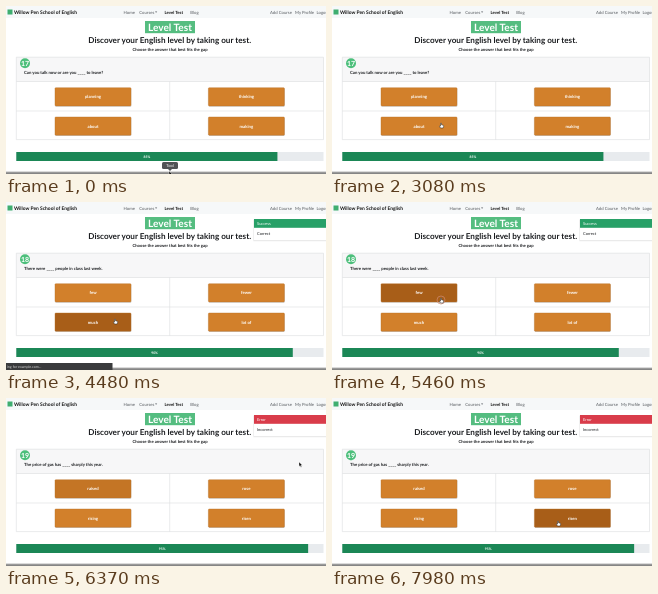
Animation of 320x168 px, one loop 8000 ms. Source, as an HTML page:

```html
<!DOCTYPE html>
<html lang="en">
<head>
<meta charset="utf-8">
<title>Level Test</title>
<style>
  html, body { margin: 0; width: 100%; height: 100%; overflow: hidden; background: #fff; }
  svg { display: block; width: 100%; height: 100%; }
  text { font-family: Lato, "Open Sans", sans-serif; font-size: 4.25px; fill: #1b1d20; text-rendering: geometricPrecision; }
  .b { font-weight: 700; }
  .m { text-anchor: middle; }
  .w { fill: #fff; }
  .nav text { fill: #55595e; }
  .nav .on { fill: #111; }
  .line { stroke: #dcdee0; stroke-width: .6; fill: none; }
</style>
</head>
<body>
<svg viewBox="0 0 320 168" preserveAspectRatio="none">
  <rect width="320" height="168" fill="#fff"/>

  <g class="nav">
    <rect width="320" height="12" fill="#f6f8f9"/>
    <rect x="1.5" y="3.5" width="5" height="5" fill="#3fae70"/>
    <text class="b on" x="8" y="7.8" style="font-size:4.9px">Willow Pen School of English</text>
    <text x="117.6" y="7.5">Home</text>
    <text x="133.3" y="7.5">Courses</text>
    <path d="M149 5.5h2.2l-1.1 1.3z" fill="#55595e"/>
    <text class="b on" x="158.5" y="7.5">Level Test</text>
    <text x="184.3" y="7.5">Blog</text>
    <text x="264" y="7.5">Add Course</text>
    <text x="289" y="7.5">My Profile</text>
    <text x="310.5" y="7.5">Logout</text>
  </g>

  <rect x="139" y="15" width="50" height="12.2" fill="#55bd80"/>
  <text class="b m w" x="164" y="24.7" style="font-size:10.1px">Level Test</text>
  <text class="b m" x="163.7" y="36.8" style="font-size:8.15px">Discover your English level by taking our test.</text>
  <text class="b m" x="164" y="45" style="font-size:4.2px">Choose the answer that best fits the gap</text>

  <rect x="10.3" y="51.2" width="307.2" height="24.3" fill="#f7f7f8"/>
  <path class="line" d="M10.3 51.2H317.5V133.6H10.3zM10.3 75.5H317.5M10.3 105H317.5M163.7 75.5V133.6"/>
  <circle cx="19" cy="57.2" r="5" fill="#4cbf7b"/>
  <text id="num" class="b m w" x="19" y="59.7" style="font-size:7px"></text>
  <text id="ask" class="b" x="18" y="68.4"></text>
  <g id="answers"></g>

  <rect x="10.3" y="146" width="307.2" height="9" fill="#e8ebee"/>
  <rect id="bar" x="10.3" y="146" height="9" fill="#1b8756"/>
  <text id="pct" class="b m w" y="151.8" style="font-size:3.4px"></text>

  <rect y="165.4" width="320" height=".8" fill="#c4c4c4"/>
  <rect y="166.2" width="320" height="1.8" fill="#858585"/>

  <g id="status">
    <rect y="161" width="106.5" height="7" fill="#3a3b3d"/>
    <text x="1" y="165.6" style="font-size:3.6px;fill:#d5d5d5">ing for example.com...</text>
  </g>

  <g id="toast">
    <rect x="247.4" y="17.6" width="75" height="21.6" fill="#000" opacity=".1"/>
    <rect x="248" y="17" width="74" height="21.2" fill="#fff"/>
    <rect id="head" x="248" y="17" width="74" height="8.8"/>
    <text id="state" class="w" x="251" y="23" style="font-size:4px"></text>
    <text id="note" x="251" y="32.6" style="font-size:4px"></text>
  </g>

  <g id="tip">
    <rect x="156" y="156" width="16" height="7" rx="1.5" fill="#505255"/>
    <path d="M162 163h4l-2 2z" fill="#505255"/>
    <text class="m w" x="164" y="161" style="font-size:4px">Tool</text>
  </g>

  <circle id="ring" r="4" fill="none" stroke="#cf8a70" stroke-width=".7"/>
  <g id="cursor">
    <path id="arrow" d="M0 0V4.6L1.1 3.6 1.9 5.3 2.7 4.9 1.9 3.3H3.3z" fill="#111" stroke="#fff" stroke-width=".35"/>
    <path id="hand" d="M-.5 .2Q0-.5 .5 .2V1.8L2.4 2.3Q2.9 2.6 2.6 3.6L2.1 5H-.5L-1.6 3.2Q-1.3 2.5-.5 3.1z" fill="#fff" stroke="#222" stroke-width=".5"/>
  </g>
</svg>
<script>
const $ = id => document.getElementById(id);
const STEP = 70, LOOP = 8000;

const pages = [
  { at: 0, num: 17, pct: 85, ask: 'Can you talk now or are you ____ to leave?',
    words: ['planning', 'thinking', 'about', 'making'] },
  { at: 3920, num: 18, pct: 90, ask: 'There were ____ people in class last week.',
    words: ['few', 'fewer', 'much', 'lot of'], toast: ['#27a067', 'Success', 'Correct'] },
  { at: 5670, num: 19, pct: 95, ask: 'The price of gas has ____ sharply this year.',
    words: ['raised', 'rose', 'rising', 'risen'], toast: ['#d93c4a', 'Error', 'Incorrect'] }
];

// time, x, y of the pointer
const path = [
  [0, 163, 165], [70, 163, 165], [840, 124, 101], [1120, 121.5, 96], [1260, 121.5, 96],
  [1750, 236, 95], [1890, 236, 95], [2310, 159.5, 117], [2450, 159.5, 117],
  [2730, 109, 117], [4690, 109, 117], [5320, 109, 96], [6160, 109, 96],
  [6370, 293, 64], [6650, 303, 53], [7000, 300, 54], [7700, 226, 123], [LOOP, 226, 123]
];

// button, darkens at, lightens at
const hovers = [[2, 3360, 4900], [0, 5040, 6230], [3, 7490, 9000]];
const clicks = [[3360, 3570], [5390, 5600]];
const hands = [[2660, 4830], [5040, 6230], [7490, LOOP]];

const clamp = v => Math.max(0, Math.min(1, v));
const within = (list, t) => list.some(([a, b]) => t >= a && t < b);
const show = (id, on) => $(id).setAttribute('visibility', on ? 'visible' : 'hidden');
const set = (el, attrs) => { for (const k in attrs) el.setAttribute(k, attrs[k]); };
const mix = (a, b, k) => `rgb(${a.map((v, i) => Math.round(v + (b[i] - v) * k))})`;

$('answers').innerHTML = [0, 1, 2, 3].map(i => {
  const x = 49 + (i % 2) * 153.4, y = i < 2 ? 81.7 : 111;
  return `<rect x="${x + .3}" y="${y + .7}" width="76" height="18.4" rx=".8" fill="#000" opacity=".2"/>
    <rect class="face" x="${x}" y="${y}" width="76" height="18.2" rx=".8" stroke="#b87028" stroke-width=".4"/>
    <text class="b m w word" x="${x + 38}" y="${y + 10.6}"></text>`;
}).join('');
const faces = document.querySelectorAll('.face');
const words = document.querySelectorAll('.word');

function pointer(t) {
  const i = path.findIndex(p => p[0] > t);
  const [t0, x0, y0] = path[i - 1], [t1, x1, y1] = path[i];
  const u = (t - t0) / (t1 - t0), k = u * u * (3 - 2 * u);
  return [x0 + (x1 - x0) * k, y0 + (y1 - y0) * k];
}

function draw(t) {
  const page = pages.filter(p => p.at <= t).pop();
  $('num').textContent = page.num;
  $('ask').textContent = page.ask;
  $('pct').textContent = page.pct + '%';

  const width = 307.2 * page.pct / 100;
  set($('bar'), { width });
  set($('pct'), { x: 10.3 + width / 2 });

  faces.forEach((face, i) => {
    const h = hovers.find(v => v[0] === i);
    const dark = h ? clamp((t - h[1] + STEP) / 210) - clamp((t - h[2]) / 210) : 0;
    face.setAttribute('fill', mix([210, 128, 43], [168, 94, 24], dark));
    words[i].textContent = page.words[i];
  });

  show('toast', page.toast);
  if (page.toast) {
    const [color, state, note] = page.toast;
    set($('head'), { fill: color });
    $('state').textContent = state;
    $('note').textContent = note;
    set($('toast'), { opacity: clamp((t - page.at + STEP) / 280) });
  }

  show('tip', t < 140);
  show('status', t >= 3360 && t < 4690);

  const [x, y] = pointer(t), hand = within(hands, t);
  set($('cursor'), { transform: `translate(${x} ${y})` });
  set($('ring'), { cx: x, cy: y + 2 });
  show('ring', within(clicks, t));
  show('hand', hand);
  show('arrow', !hand);
}

function tick() {
  const t = performance.now() % LOOP;
  draw(Math.floor(t / STEP) * STEP);
  requestAnimationFrame(tick);
}
tick();
</script>
</body>
</html>
```
